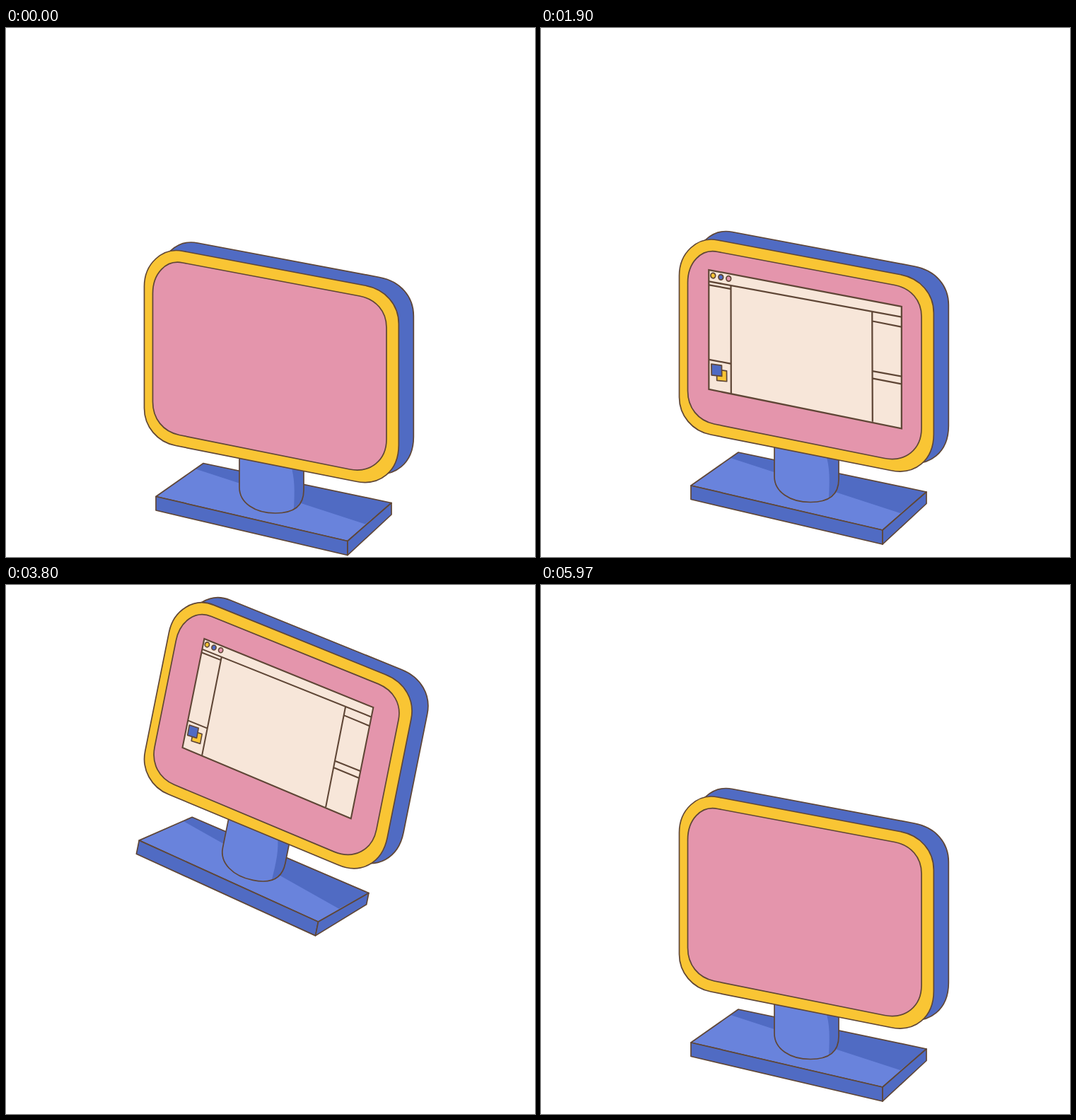
An HTML page for the animation above (6.01 s loop, 748 by 748 pixels).

```html
<!DOCTYPE html>
<html lang="en">
<head>
<meta charset="utf-8">
<title>Hopping monitor</title>
<style>
  html, body { margin: 0; width: 100%; height: 100%; overflow: hidden; background: #fff; }
  svg { display: block; width: 100%; height: 100%; }
  .line { stroke: #5f4636; stroke-width: 1.7; stroke-linejoin: round; }
  .ui { stroke-width: 2.2; stroke-linejoin: miter; }
  .dark { fill: #506bc3; }
  .light { fill: #6983dc; }
  .gold { fill: #f9c534; }
  .pink { fill: #e495ac; }
  .cream { fill: #f7e6d9; }
  .none { fill: none; }
</style>
</head>
<body>
<svg viewBox="0 0 748 748">
  <defs>
    <path id="case" d="M195.5 350C195.5 318 221 294 250 300L507 348.5C537 354 555.3 376 555.3 403V574C555.3 611 529 633 494 625.5L240 575C214 570 195.5 548 195.5 522Z"/>
    <path id="neck" d="M330 585V634C330 656 352 670.5 381 670.5C409 670.5 421 658 421 638V600"/>
  </defs>
  <g id="monitor">
    <!-- stand -->
    <path class="light" d="M212 647L279 600L545 656L483 710Z"/>
    <path class="dark" d="M279 600L545 656L508 686L268 608Z"/>
    <path class="line none" d="M212 647L279 600L545 656L483 710Z"/>
    <path class="line dark" d="M212 647L483 710V730L212 666.5Z"/>
    <path class="line dark" d="M483 710L545 656V672.5L483 730Z"/>
    <use href="#neck" class="light"/>
    <path class="dark" d="M402 600C409 622 408 640 407 664C416 658 421 650 421 638V600Z"/>
    <use href="#neck" class="line none"/>
    <!-- case and screen -->
    <use href="#case" class="line dark" x="21" y="-11.5"/>
    <use href="#case" class="line gold"/>
    <path class="line pink" d="M207.5 360C207.5 332 226 311.5 250 316.5L500 363.5C523 368 538 385 538 408V566C538 596 515 614 486 608.5L245 560C222 555 207.5 537 207.5 513Z"/>
    <g id="app">
      <g transform="translate(.3 116) rotate(-6.6 385.2 393)">
        <path class="line ui cream" d="M259 212L519.5 293.5L500 462L240 377Z"/>
        <path class="line ui none" d="M257.5 228L518 308M257 233L287 242M287 237L270 387M478 296L461 448M477 309L516 321.5M469 378L508.5 390M467.5 388L507 400.5M245 336L274 345"/>
        <path class="line gold" d="M254 351L267.5 354.5L266 369L252.5 366Z"/>
        <path class="line dark" d="M247.5 342.5L261.5 346L260 361L246 358Z"/>
        <g class="line">
          <ellipse class="gold" cx="264" cy="220.5" rx="3.3" ry="3.7"/>
          <ellipse class="dark" cx="274.5" cy="224" rx="3.3" ry="3.7"/>
          <ellipse class="pink" cx="285" cy="227.2" rx="3.3" ry="3.7"/>
        </g>
      </g>
    </g>
  </g>
</svg>
<script>
const LOOP = 6010, HOP = 75; // ms per loop, 25 fps steps per hop
const WOUND = 4, PEAK = 26, LAND = 35, SETTLE = 45; // steps within a hop
const OPEN = 2, CLOSE = 67;

const clamp = x => Math.min(1, Math.max(0, x));
const span = (x, from, to) => clamp((x - from) / (to - from));
const easeIn = (u, power) => u ** power;
const easeOut = (u, power) => 1 - (1 - u) ** power;

// Vertical offset: fast leap, slow drift up, accelerating fall, small bounce
const rise = step => -208 - 2.05 * step + 223.5 * Math.exp(-((step / 5.4) ** 2));

function lift(step) {
  if (step < PEAK) return rise(step);
  if (step < LAND) return rise(PEAK) * (1 - easeIn(span(step, PEAK, LAND), 2.33));
  return -13 * Math.sin(Math.PI * span(step, LAND, SETTLE));
}

// Degrees: wind back, swing forward, straighten during the fall
function tilt(step) {
  const back = -21.5, front = 14;
  if (step < WOUND) return back * Math.sin(Math.PI / 2 * step / WOUND);
  if (step < PEAK) return back + (front - back) * easeOut(span(step, WOUND, PEAK), 2);
  return front * (1 - easeIn(span(step, PEAK, LAND), 2.53));
}

// Window size: pops open, creeps to full size, then shuts
function zoom(step) {
  const opened = 1 - Math.exp(-0.37 * Math.max(0, step - OPEN) ** (2 / 3));
  return 1.026 * opened * (1 - easeIn(span(step, CLOSE, HOP - 1), 3));
}

const monitor = document.getElementById('monitor');
const app = document.getElementById('app');

function draw(ms) {
  // 25 fps motion shown on a 30 fps grid
  const tick = Math.min(179, Math.floor((ms + 5) * 0.03));
  const step = Math.floor(tick * 5 / 6) % HOP;
  const size = zoom(step);
  monitor.setAttribute('transform',
    `translate(0 ${lift(step)}) rotate(${tilt(step)} 385.5 509)`);
  app.setAttribute('transform', `translate(364 445) scale(${size}) translate(-364 -445)`);
  app.setAttribute('visibility', size > 0 ? 'visible' : 'hidden');
}

const start = performance.now();
function loop() {
  draw((performance.now() - start) % LOOP);
  requestAnimationFrame(loop);
}
loop();
</script>
</body>
</html>
```
